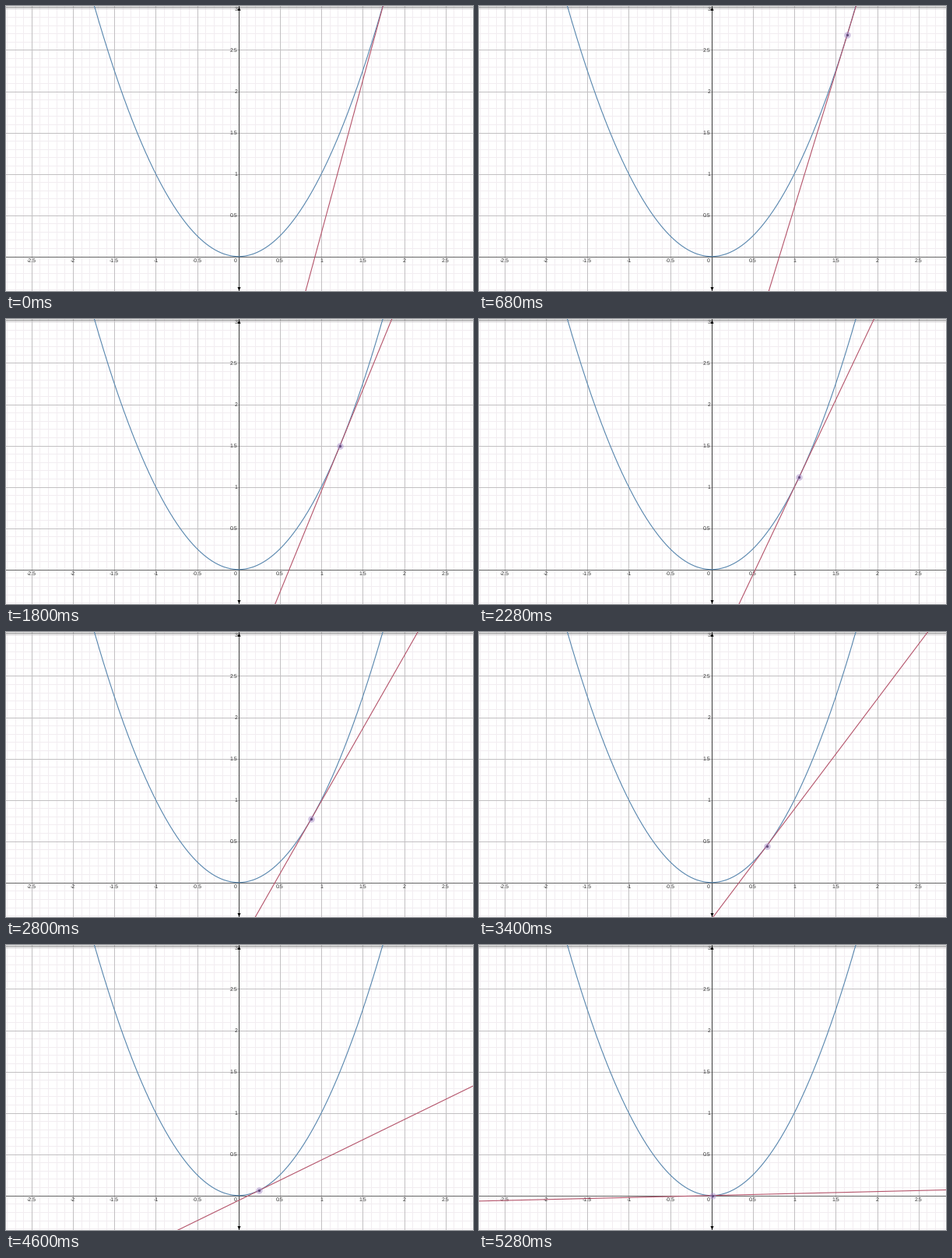
A matplotlib script for the animation above (5320 ms loop, 600 by 366 pixels).

```python
import numpy as np
import matplotlib.pyplot as plt
from matplotlib.animation import FuncAnimation

W, H, DPI = 600, 366, 100
FRAMES, STEP = 133, 40          # 5320 ms loop
OX, OY = 298.8, 321.7           # origin in pixels
UX, UY = 106.4, 106.1           # pixels per unit
PX = 72 / DPI                   # one pixel in points

MINOR, MAJOR = "#f2edf1", "#c2c0c2"
BLUE, RED = "#5685ad", "#b4536a"

# Hand-dragged contact point: time (ms) and its x coordinate
DRAG_T = [0, 680, 1120, 1800, 2800, 3360, 3920, 4000, 4480, 4600, 5040, 5280]
DRAG_X = [1.846, 1.637, 1.455, 1.224, 0.879, 0.679, 0.492, 0.438, 0.297, 0.2447, 0.0995, 0.012]


def sx(x):
    return OX + UX * np.asarray(x)


def sy(y):
    return OY - UY * np.asarray(y)


plt.rcParams["font.family"] = "Liberation Sans"
plt.rcParams["text.hinting"] = "none"
plt.rcParams["text.hinting_factor"] = 1
fig = plt.figure(figsize=(W / DPI, H / DPI), dpi=DPI, facecolor="white")
ax = fig.add_axes([0, 0, 1, 1])
ax.set_xlim(0, W)
ax.set_ylim(H, 0)
ax.axis("off")


def grid(step, color, z):
    for k in range(-int(3 / step), int(3.1 / step) + 1):
        ax.axvline(sx(k * step), color=color, lw=PX, zorder=z)
        ax.axhline(sy(k * step), color=color, lw=PX, zorder=z)


def label(x, y, value, ha):
    ax.text(x, y, f"{value:g}", size=6.6 * PX, color="#333333",
            ha=ha, va="center_baseline", zorder=4)


grid(0.1, MINOR, 1)
grid(0.5, MAJOR, 2)
ax.axhline(0.5, color="#808080", lw=PX, zorder=3)
ax.axhline(OY, color="#666666", lw=PX, zorder=3)
ax.axvline(OX, color="#3c3c3c", lw=PX, zorder=3)
mid = OX + 0.7
for tip, base in ((1, 6), (H, H - 5)):
    ax.fill([mid, mid - 2, mid + 2], [tip, base, base], color="black", lw=0, zorder=4)

for k in range(-5, 6):
    if k:
        label(sx(k / 2), 326.3, k / 2, "center")
label(295, 326.3, 0, "center")
for k in range(1, 7):
    label(297.5, sy(k / 2), k / 2, "right")

xs = np.linspace(-1.8, 1.8, 300)
ax.plot(sx(xs), sy(xs ** 2), color=BLUE, lw=1.1 * PX, zorder=5)

tangent, = ax.plot([], [], color=RED, lw=1.1 * PX, zorder=6)
halo, = ax.plot([], [], "o", ms=8.5 * PX, mfc="#a68cc8", mec="none", alpha=0.5, zorder=7)
dot, = ax.plot([], [], "o", ms=3.4 * PX, mfc="#655080", mec="none", zorder=8)

ends = np.array([-3.0, 3.0])


def update(i):
    a = np.interp(i * STEP, DRAG_T, DRAG_X)
    tangent.set_data(sx(ends), sy(2 * a * ends - a * a))
    for mark in (halo, dot):
        mark.set_data([sx(a)], [sy(a * a)])
    return tangent, halo, dot


anim = FuncAnimation(fig, update, frames=FRAMES, interval=STEP,
                     repeat=True, repeat_delay=0, blit=False)
plt.show()
```
